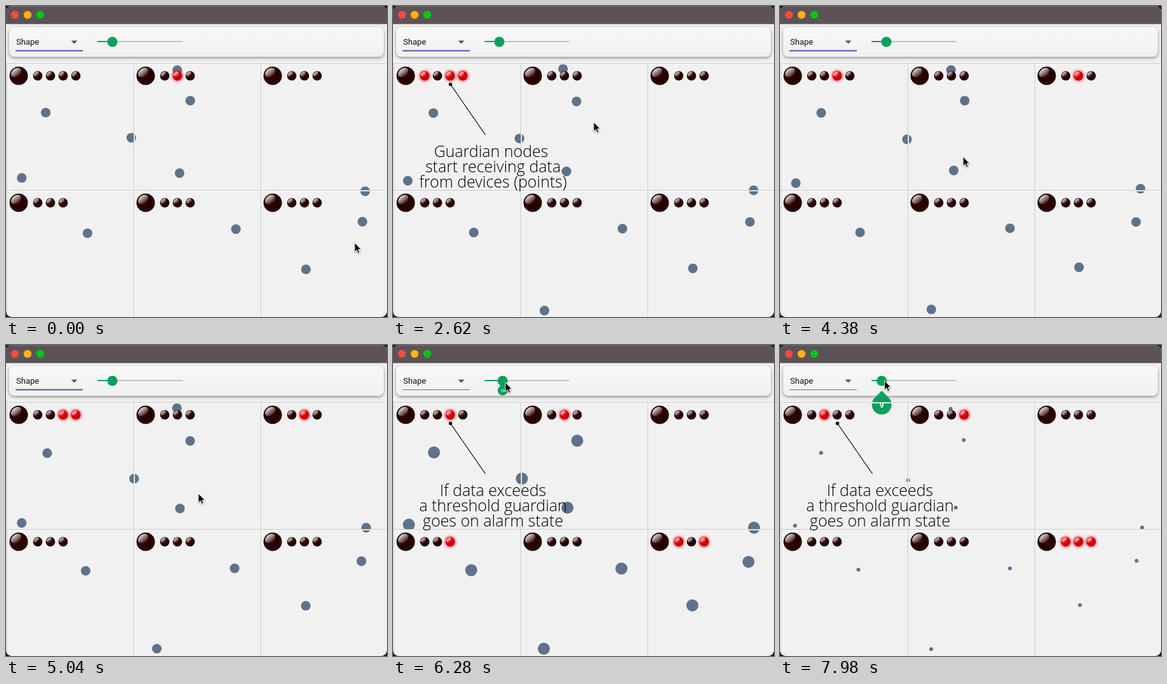
Write an HTML page that moves like this. It is 600x490 px and loops after 8 s.

```html
<!DOCTYPE html>
<html lang="en">
<head>
<meta charset="utf-8">
<title>Guardian nodes</title>
<style>
  html, body { margin: 0; width: 100%; height: 100%; overflow: hidden; background: #1c1a1b; }
  svg { display: block; width: 100%; height: 100%; }
  .card { filter: drop-shadow(0 2px 2.5px #0006); }
  .select { font: 13px Roboto, sans-serif; fill: #111; }
  .value { font: 700 12px Roboto, sans-serif; fill: #fff; text-anchor: middle; }
  .caption { font: 300 25px "Open Sans", sans-serif; fill: #000; text-anchor: middle; }
  .glow { fill: #ff1020; opacity: .5; filter: blur(1.8px); }
  .pointer { filter: drop-shadow(0 1px 1px #0006); }
</style>
</head>
<body>
<svg viewBox="0 0 600 490" xmlns="http://www.w3.org/2000/svg">
  <defs>
    <clipPath id="window"><rect width="600" height="490" rx="9"/></clipPath>
    <linearGradient id="cardFill" x2="0" y2="1">
      <stop stop-color="#f8f8f8"/><stop offset="1" stop-color="#f0f0f0"/>
    </linearGradient>
    <radialGradient id="dark" cx=".4" cy=".4" r=".62">
      <stop stop-color="#3a0c0c"/><stop offset=".6" stop-color="#240000"/>
      <stop offset="1" stop-color="#2c0606"/>
    </radialGradient>
    <radialGradient id="lit" cx=".4" cy=".4" r=".62">
      <stop stop-color="#e2161c"/><stop offset=".6" stop-color="#d00008"/>
      <stop offset="1" stop-color="#c4000a"/>
    </radialGradient>
    <linearGradient id="gloss" x2="0" y2="1">
      <stop stop-color="#fff" stop-opacity=".85"/><stop offset="1" stop-color="#fff" stop-opacity=".08"/>
    </linearGradient>
  </defs>
  <g clip-path="url(#window)">
    <rect width="600" height="490" fill="#f1f1f1"/>
    <rect width="600" height="28.500" fill="#5b5357"/>
    <path d="M0 .5H600" stroke="#777073"/>
    <circle cx="14" cy="14" r="6.200" fill="#ff4842"/>
    <circle cx="34" cy="14" r="6.200" fill="#ffb20a"/>
    <circle cx="54" cy="14" r="6.200" fill="#06c418"/>
    <rect class="card" x="5" y="33" width="590" height="47" rx="8" fill="url(#cardFill)"/>
    <text class="select" x="16" y="61">Shape</text>
    <path d="M102.500 54.500h10l-5 5z" fill="#555"/>
    <path id="underline" d="M15 70.500H121"/>
    <path d="M144 56H278" stroke="#c2c2c2" stroke-width="2"/>
    <path id="range" stroke="#08a05c" stroke-width="2"/>
    <g id="dots" fill="#5e738b"></g>
    <g id="thumb">
      <g id="bubble">
        <path d="M0 15.600L11 26.500A15.500 15.500 0 1 1-11 26.500Z" fill="#08a05c"/>
        <text class="value" id="value" y="42"></text>
      </g>
      <circle r="8" fill="#08a05c"/>
    </g>
    <path d="M2.500 91V490M202.500 91V490M402.500 91V490M0 91.500H600M0 291.500H600" stroke="#fafafa"/>
    <path d="M1.500 91V490M201.500 91V490M401.500 91V490M0 90.500H600M0 290.500H600" stroke="#c6cac4"/>
    <g id="bulbs"></g>
    <g id="leader">
      <path d="M90.500 123.500L145.500 203" stroke="#000" stroke-width="1.200"/>
      <circle cx="90.500" cy="123.500" r="2.700"/>
    </g>
    <g id="receiving" class="caption">
      <text x="154.500" y="238">Guardian nodes</text>
      <text x="157.500" y="262">start receiving data</text>
      <text x="157.500" y="286">from devices (points)</text>
    </g>
    <g id="alarm" class="caption">
      <text x="157.500" y="238">If data exceeds</text>
      <text x="157.500" y="262">a threshold guardian</text>
      <text x="157.500" y="286">goes on alarm state</text>
    </g>
    <path id="cursor" class="pointer" d="M0 0V14.500L3.300 11.500L5.600 16.600L8 15.500L5.800 10.600H10.300Z"
      fill="#000" stroke="#fff" stroke-width="1"/>
  </g>
</svg>
<script>
const LOOP = 8000;
const $ = id => document.getElementById(id);
const clamp = v => Math.max(0, Math.min(1, v));

function add(parent, tag, attrs) {
  const el = document.createElementNS('http://www.w3.org/2000/svg', tag);
  for (const name in attrs) el.setAttribute(name, attrs[name]);
  return parent.appendChild(el);
}
const show = (el, on) => { el.style.display = on ? '' : 'none'; };

// Repeatable noise in -1..1.
function noise(seed, step) {
  const v = Math.sin(seed * 127.1 + step * 311.7) * 43758.5453;
  return 2 * (v - Math.floor(v)) - 1;
}

// Devices hop around a home position, some drifting by (dx, dy) over the loop.
const dots = [];
function dot(x, y, dx = 0, dy = 0, visible = () => true) {
  dots.push({ x, y, dx, dy, visible, seed: dots.length + 1, el: add($('dots'), 'circle', {}) });
}
dot(63, 168, 2, 2);
dot(24, 271, 1, 14);
dot(197, 208, 6, 4);
dot(269, 100, 0, 0, t => t < 5800 || t > 6800);
dot(290, 150);
dot(273, 263, 3, -8);
dot(565, 291, 5, -4);
dot(561, 341);
dot(472, 416, 0, -7);
dot(237, 479, 2, 0, t => t > 650);
dot(361, 351);
dot(128, 359, -5, -4);

function position({ x, y, dx, dy, seed }, t) {
  const hop = Math.floor(t / 640 + seed * .37);
  const p = t / LOOP;
  return [x + dx * p + 1.3 * noise(seed, hop), y + dy * p + 1.3 * noise(seed + 50, hop)];
}

// Bulbs receiving data in each second, named by cell and place.
const SIGNALS = ['b1', 'a2', 'a0 a2 a3', 'a0 a2', 'a2 c1', 'a2 a3 c1', 'a2 b1 d2 f0 f2', 'a1 b2 f0 f1 f2'];

function ball(cx, cy, r) {
  const body = add($('bulbs'), 'circle', { cx, cy, r, fill: 'url(#dark)' });
  add($('bulbs'), 'ellipse', {
    rx: r * .62, ry: r * .42, fill: 'url(#gloss)',
    transform: `translate(${cx - r * .28} ${cy - r * .36}) rotate(-38)`
  });
  return body;
}

const bulbs = [];
[...'abcdef'].forEach((cell, i) => {
  const x = i % 3 * 200, y = 110 + Math.floor(i / 3) * 200;
  ball(x + 20, y, 14.5);
  for (let k = 0; k < (i ? 3 : 4); k++) {
    const cx = x + 50 + k * 20;
    const glow = add($('bulbs'), 'circle', { cx, cy: y, r: 9.5, class: 'glow' });
    bulbs.push({ name: cell + k, glow, body: ball(cx, y, 7.4) });
  }
});

// Pointer stops with arrival times; every move takes the same time.
const MOVE = 700;
const STOPS = [
  { at: 0, x: 549, y: 373 }, { at: 2500, x: 316, y: 183 }, { at: 3400, x: 269, y: 242 },
  { at: 4700, x: 303, y: 234 }, { at: 6050, x: 177, y: 59 }, { at: 7700, x: 164.5, y: 56 }
];
function pointer(t) {
  return STOPS.reduce((from, stop) => {
    const p = clamp((t - stop.at + MOVE) / MOVE);
    const e = p * p * (3 - 2 * p);
    return { x: from.x + (stop.x - from.x) * e, y: from.y + (stop.y - from.y) * e };
  }, STOPS[0]);
}

function draw(t) {
  const { x, y } = pointer(t);
  $('cursor').setAttribute('transform', `translate(${x} ${y})`);

  const dragging = t >= 6100;
  const thumb = dragging ? x - 4.3 : 167.5;
  const radius = 3 + 6.5 * clamp((thumb - 160.2) / 12.5) ** .65;
  const grow = clamp((t - 6190) / 180);
  $('range').setAttribute('d', `M144 56H${thumb}`);
  $('thumb').setAttribute('transform', `translate(${thumb} 56.5)`);
  $('bubble').setAttribute('transform', `translate(0 ${7.5 * (grow - 1)}) scale(${grow})`);
  $('value').textContent = Math.round(9 + (thumb - 160.2) * .8);
  $('underline').setAttribute('stroke', dragging ? '#6c6c80' : '#4855ad');
  $('underline').setAttribute('stroke-width', dragging ? 1 : 2);

  for (const d of dots) {
    const [cx, cy] = position(d, t);
    d.el.setAttribute('cx', cx);
    d.el.setAttribute('cy', cy);
    d.el.setAttribute('r', radius);
    show(d.el, d.visible(t));
  }

  const signals = SIGNALS[Math.floor(t / 1000)];
  for (const { name, glow, body } of bulbs) {
    const on = signals.includes(name);
    show(glow, on);
    body.setAttribute('fill', on ? 'url(#lit)' : 'url(#dark)');
  }

  const receiving = t >= 800 && t < 4300, alarm = t >= 5700;
  show($('receiving'), receiving);
  show($('alarm'), alarm);
  show($('leader'), receiving || alarm);
}

const start = performance.now();
function frame() {
  draw((performance.now() - start) % LOOP);
  requestAnimationFrame(frame);
}
frame();
</script>
</body>
</html>
```
